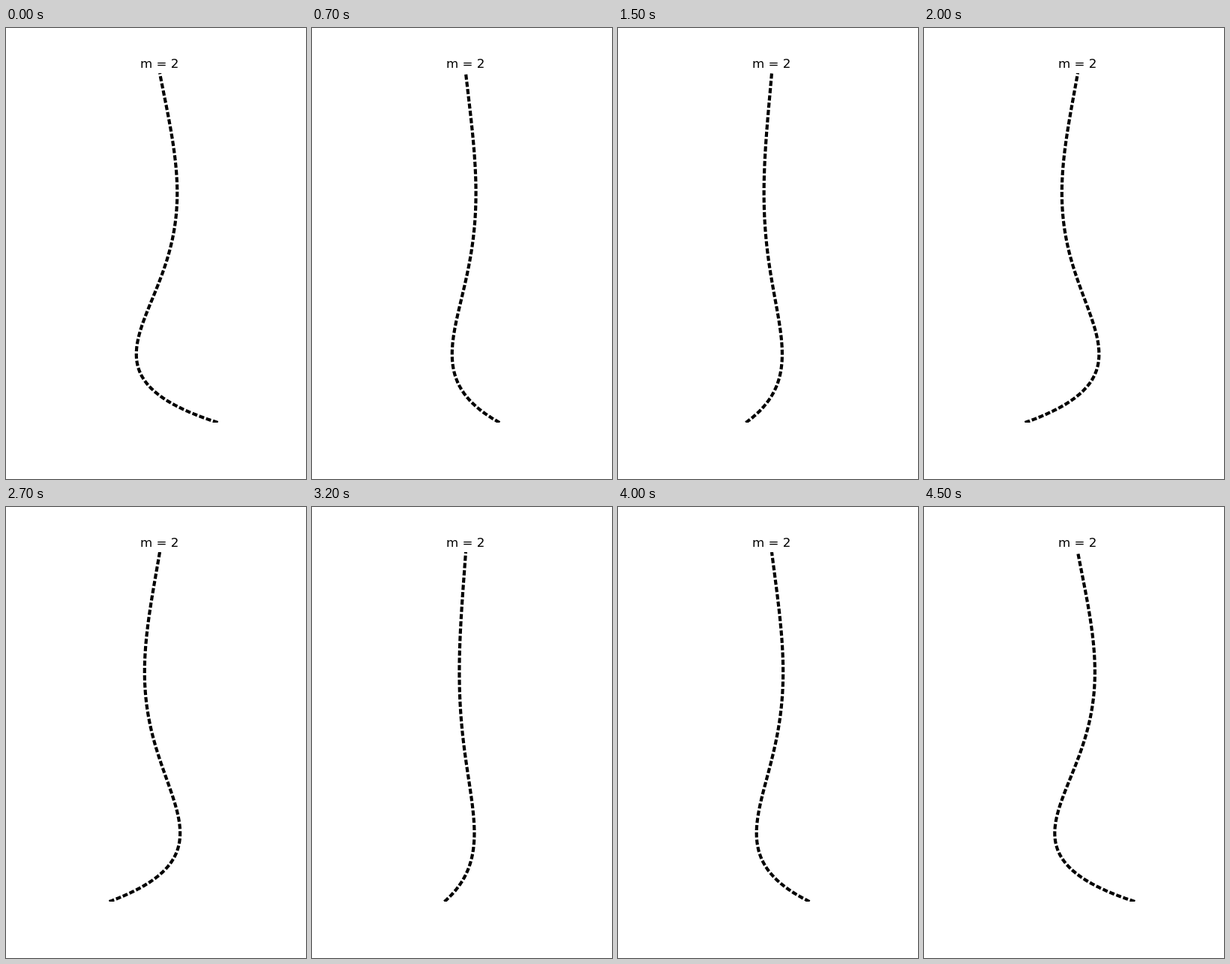
Animation of 400x600 px, one loop 4.6 s. Source, as an HTML page:

```html
<!DOCTYPE html>
<html lang="en">
<head>
<meta charset="utf-8">
<title>Hanging chain, m = 2</title>
<style>
  html, body { margin: 0; width: 100%; height: 100%; overflow: hidden; background: #fff; }
  svg { display: block; }
  text { font: 16.667px "DejaVu Sans", sans-serif; }
  #chain { fill: none; stroke: #000; stroke-width: 4.167; stroke-linejoin: round; stroke-dasharray: 6.944 2.778; }
</style>
</head>
<body>
<svg width="400" height="600" viewBox="0 0 400 600">
  <clipPath id="axes"><rect x="50" y="60" width="310" height="465"/></clipPath>
  <text x="179" y="53">m = 2</text>
  <g clip-path="url(#axes)"><polyline id="chain"/></g>
</svg>
<script>
  const STEP = 100, STEPS = 46;
  const CENTER = 205, BOTTOM = 525, LENGTH = 465, AMPLITUDE = 77.5;
  const ROOT = 8.653728;                              // third zero of J0
  const OMEGA = ROOT / 2 * Math.sqrt(9.81) * 0.01;    // phase per step
  const POINTS = 400;

  // Bessel function J0 by its power series
  function j0(x) {
    let term = 1, sum = 1;
    for (let k = 1; k < 40; k++) {
      term *= -(x * x) / (4 * k * k);
      sum += term;
    }
    return sum;
  }

  // Mode shape, from the free end up to the support
  const shape = Array.from({ length: POINTS + 1 }, (_, i) => {
    const z = i / POINTS;
    return { x: AMPLITUDE * j0(ROOT * Math.sqrt(z)), y: BOTTOM - LENGTH * z };
  });

  const chain = document.getElementById("chain");
  let shown = -1;

  function draw() {
    const step = Math.floor(performance.now() / STEP) % STEPS;
    if (step !== shown) {
      shown = step;
      const swing = Math.cos(OMEGA * step);
      chain.setAttribute("points",
        shape.map(p => `${(CENTER + swing * p.x).toFixed(3)},${p.y.toFixed(3)}`).join(" "));
    }
    requestAnimationFrame(draw);
  }
  draw();
</script>
</body>
</html>
```
